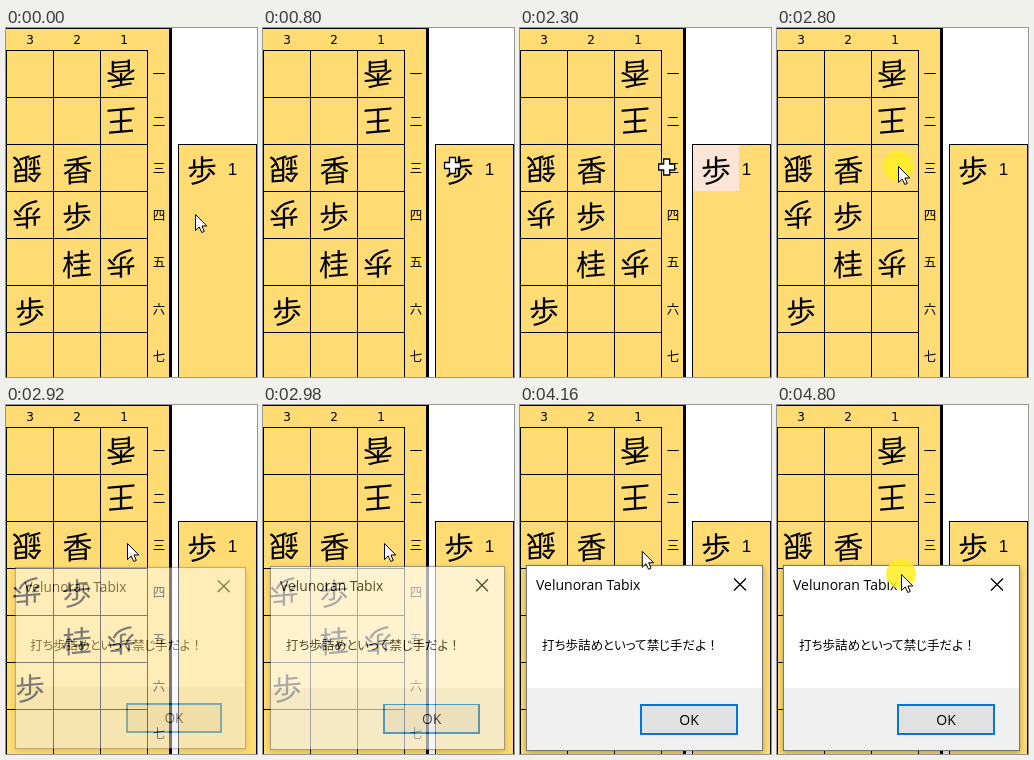
Animation of 251 by 349 pixels, one loop 4.98 s. Source, as an HTML page:

```html
<!DOCTYPE html>
<html lang="ja">
<head>
<meta charset="utf-8">
<title>Shogi drop warning</title>
<style>
  html, body { margin: 0; width: 100%; height: 100%; overflow: hidden; background: #fff; }
  svg { display: block; }
  text { font-family: "Noto Sans CJK JP", "Noto Sans CJK", sans-serif; text-anchor: middle; }
  .piece { font-size: 30px; font-weight: 500; }
  .digit { font-family: "DejaVu Sans", sans-serif; }
  .count { font-family: "Liberation Sans", sans-serif; }
  .ui { font-family: "Open Sans", sans-serif; font-size: 14px; }
  .message { font-size: 12.5px; font-feature-settings: "palt"; }
  .wide { font-feature-settings: normal; }
  .start { text-anchor: start; }
  .crisp { shape-rendering: crispEdges; }
</style>
</head>
<body>
<svg id="stage" width="251" height="349" viewBox="0 0 251 349">
  <defs>
    <filter id="shadow" x="-10%" y="-10%" width="120%" height="120%">
      <feDropShadow dx="0" dy="2" stdDeviation="3" flood-opacity=".3"/>
    </filter>
  </defs>
  <g class="crisp" fill="#ffdc73" stroke="#000">
    <rect width="164" height="349" stroke="none"/>
    <path d="M0 .5H166"/>
    <path d="M164.5 0V349" stroke-width="3"/>
    <rect x="172.5" y="116.5" width="78" height="240"/>
  </g>
  <rect id="highlight" class="crisp" x="173" y="117" width="46" height="46" fill="#fce4d6"/>
  <g id="board"></g>
  <g id="dialog">
    <g class="crisp">
      <rect x="6.5" y="160.5" width="236" height="185" fill="#fff" stroke="#777" filter="url(#shadow)"/>
      <rect x="7" y="283" width="235" height="62" fill="#f0f0f0"/>
      <rect x="121" y="300" width="96" height="29" fill="#e1e1e1" stroke="#0078d7" stroke-width="2"/>
    </g>
    <path d="M214 173.5l12 12m0-12l-12 12" stroke="#000" stroke-width="1.3" fill="none"/>
    <text class="ui start" x="16" y="185">Velunoran Tabix</text>
    <text class="message start" x="22" y="245">打ち歩詰めといって禁じ手だよ<tspan class="wide">！</tspan></text>
    <text class="ui" x="169" y="320">OK</text>
  </g>
  <circle id="click" r="15" fill="#ffee22" fill-opacity=".85"/>
  <g id="pointer" fill="#fff" stroke="#000">
    <path id="arrow" d="M.5 .5V16.5L4.2 13L6.8 18.5L9.3 17.4L6.9 12H11.8Z"/>
    <path id="cross" d="M-3-8h6v5h5v6h-5v5h-6v-5h-5v-6h5z" stroke-width="1.3"/>
  </g>
</svg>
<script>
const LOOP = 4980, CELL = 47;
const el = id => document.getElementById(id);
const [highlight, board, dialog, click, pointer, arrow, cross] =
  ["highlight", "board", "dialog", "click", "pointer", "arrow", "cross"].map(el);

const label = (s, x, y, size, type = "") =>
  `<text class="${type}" x="${x}" y="${y + size * .37}" font-size="${size}">${s}</text>`;
// A slight skew gives the pieces their brush-like rising strokes
const piece = (s, x, y, flipped) =>
  `<text class="piece" y="11.4" transform="translate(${x} ${y}) rotate(${flipped ? 180 : 0}) skewY(-5)">${s}</text>`;

let lines = "";
for (let i = 0; i < 4; i++) lines += `M${i * CELL + .5} 22V349`;
for (let i = 0; i < 7; i++) lines += `M0 ${22.5 + i * CELL}H142`;

board.innerHTML =
  `<path class="crisp" d="${lines}" stroke="#000"/>` +
  [..."321"].map((s, i) => label(s, 24 + i * CELL, 12, 12, "digit")).join("") +
  [..."一二三四五六七"].map((s, i) => label(s, 153, 46 + i * CELL, 12.5)).join("") +
  label("1", 226.5, 141, 17, "count") +
  [
    ["香", 115, 46, true], ["王", 115, 93, true], ["銀", 21, 141, true],
    ["歩", 21, 187, true], ["歩", 115, 236, true],
    ["香", 71.5, 142], ["歩", 71, 188], ["桂", 71, 236], ["歩", 24, 283], ["歩", 196, 142]
  ].map(p => piece(...p)).join("");

// Pointer moves: start, end, number of steps, target x, target y
const moves = [
  [70, 190, 3, 184, 136], [500, 500, 1, 188, 136], [740, 740, 1, 189.5, 137.5],
  [980, 1050, 2, 198, 139], [2100, 2420, 6, 121, 139],
  [2793, 2793, 1, 121, 138], [4160, 4350, 4, 124, 169]
];
// Clicks: start, end, x, y
const clicks = [
  [680, 800, 190, 136], [1350, 1550, 198, 139],
  [2670, 2854, 121, 138], [4800, LOOP, 124, 169]
];

// Progress 0..1 in equal jumps, the first at start and the last at end
function stepped(t, start, end, count) {
  if (t < start) return 0;
  if (t >= end) return 1;
  return (Math.floor((t - start) / (end - start) * (count - 1)) + 1) / count;
}
const show = (node, on) => node.style.display = on ? "" : "none";

function draw(t) {
  let x = 189, y = 186;
  for (const [start, end, count, toX, toY] of moves) {
    const p = stepped(t, start, end, count);
    x += (toX - x) * p;
    y += (toY - y) * p;
  }
  pointer.setAttribute("transform", `translate(${x} ${y})`);
  const crossed = t >= 740 && t < 2793;
  show(cross, crossed);
  show(arrow, !crossed);
  show(highlight, t >= 1420 && t < 2793);

  const hit = clicks.find(([start, end]) => t >= start && t < end);
  show(click, hit);
  if (hit) click.setAttribute("transform", `translate(${hit[2]} ${hit[3]})`);

  const p = stepped(t, 2854, 3100, 5);
  const scale = 1 - .065 * (1 - p) ** 2;
  show(dialog, p > 0);
  dialog.setAttribute("opacity", p ** .8);
  dialog.setAttribute("transform", `translate(123.5 252) scale(${scale}) translate(-123.5 -252)`);
}

const begin = performance.now();
function tick() {
  draw((performance.now() - begin) % LOOP);
  requestAnimationFrame(tick);
}
tick();
</script>
</body>
</html>
```
